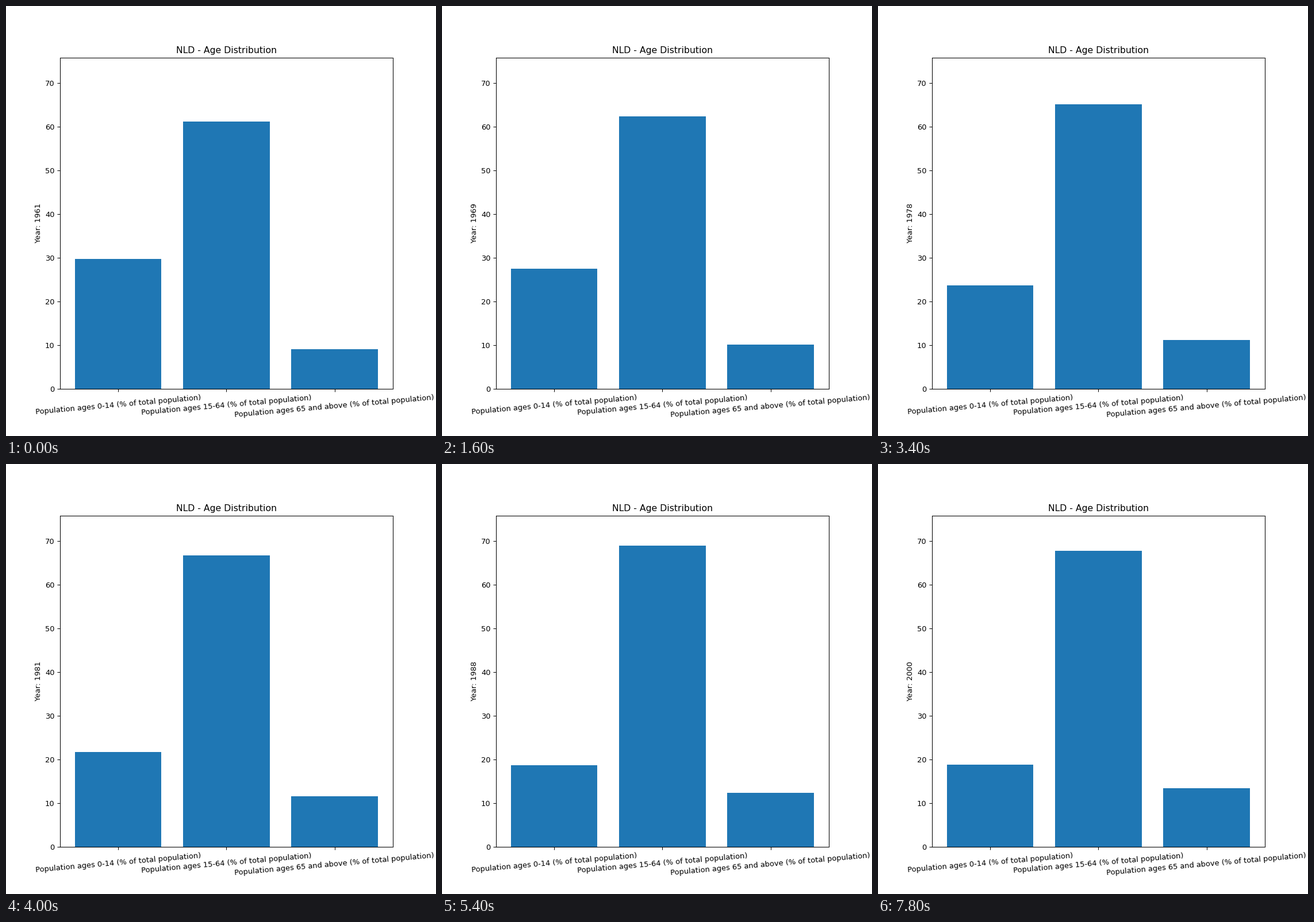
Animation of 748 by 748 pixels, one loop 8000 ms. Source, as a matplotlib script:

```python
import numpy as np
import matplotlib.pyplot as plt
from matplotlib.animation import FuncAnimation

FIRST_YEAR = 1961
YEARS = 40
GROUPS = ["0-14", "15-64", "65 and above"]

# (year, percent) turning points; the youngest group is the remainder to 100
WORKING = [(1961, 61.2), (1967, 62.28), (1969, 62.45), (1974, 63.45),
           (1984, 68.0), (1988, 69.0), (1993, 68.5), (2000, 67.75)]
SENIOR = [(1961, 9.1), (1974, 10.73), (1984, 11.83), (1993, 12.92),
          (2000, 13.43)]


def smooth(knots, x):
    """Cubic Hermite curve through the knots."""
    kx, ky = np.array(knots, float).T
    slope = np.gradient(ky, kx)
    i = np.clip(np.searchsorted(kx, x, side="right") - 1, 0, len(kx) - 2)
    h = kx[i + 1] - kx[i]
    t = (x - kx[i]) / h
    return ((1 + 2 * t) * (1 - t) ** 2 * ky[i]
            + t * (1 - t) ** 2 * h * slope[i]
            + t ** 2 * (3 - 2 * t) * ky[i + 1]
            + t ** 2 * (t - 1) * h * slope[i + 1])


def shares(year):
    working = smooth(WORKING, year)
    senior = smooth(SENIOR, year)
    return 100 - working - senior, working, senior


fig, ax = plt.subplots(figsize=(8, 8), dpi=93.5)
labels = [f"Population ages {g} (% of total population)" for g in GROUPS]
bars = ax.bar(labels, shares(FIRST_YEAR), color="#1f77b4")
ax.set_ylim(0, 75.87)
ax.set_title("NLD - Age Distribution")
ax.tick_params(axis="x", labelrotation=5)


def update(i):
    year = FIRST_YEAR + i
    for bar, share in zip(bars, shares(year)):
        bar.set_height(share)
    ax.set_ylabel(f"Year: {year}")
    return list(bars)


anim = FuncAnimation(fig, update, frames=YEARS, interval=200,
                     repeat=True, repeat_delay=0, blit=False)
plt.show()
```
